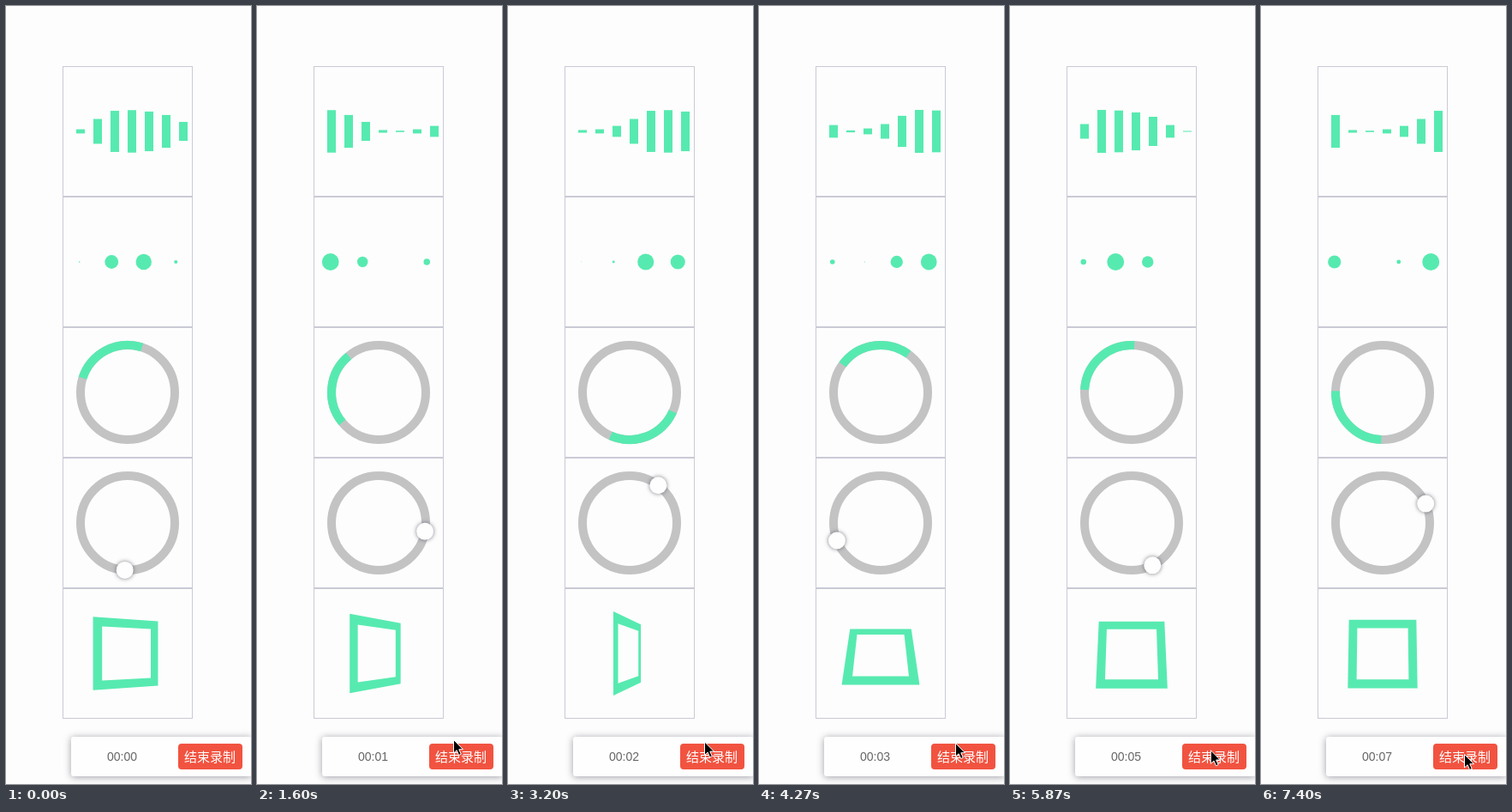
Recreate the animation shown at these times as an HTML page. Size 286 px wide and 906 px high, loop 7470 ms.

```html
<!DOCTYPE html>
<html lang="zh">
<head>
<meta charset="utf-8">
<style>
  html, body { margin: 0; width: 100%; height: 100%; overflow: hidden; background: #fdfdfd; }
  svg { display: block; }
  .panel { fill: none; stroke: #cacad6; }
  .green { fill: #57eab0; }
  .ring { fill: none; stroke: #c3c3c4; stroke-width: 10; }
  .arc { fill: none; stroke: #57eab0; stroke-width: 10; }
  .ball { fill: #fefefe; filter: drop-shadow(0 0 2.5px rgba(70, 70, 85, .7)); }
  .bar { fill: #fefefe; filter: drop-shadow(0 1px 4px rgba(40, 40, 60, .45)); }
  .time { font: 14px "Liberation Sans", Arial, sans-serif; fill: #666; }
  .label { font: 15px "Noto Sans CJK SC", "Noto Sans CJK", sans-serif; fill: #fff; text-anchor: middle; }
</style>
</head>
<body>
<svg id="stage" width="286" height="906" viewBox="0 0 286 906"></svg>
<script>
const LOOP = 7470, FRAME = 1000 / 15;
const ORIGIN = 0.67;        // moment, in seconds, when all loaders are at their start
const CLOCK_OFFSET = 0.33;
const stage = document.getElementById('stage');

function add(tag, attrs, text) {
  const el = document.createElementNS('http://www.w3.org/2000/svg', tag);
  set(el, attrs);
  if (text) el.textContent = text;
  return stage.appendChild(el);
}

function set(el, attrs) {
  for (const name in attrs) el.setAttribute(name, attrs[name]);
}

function bezier(x1, y1, x2, y2) {
  const at = (a, b, s) => 3 * a * s * (1 - s) ** 2 + 3 * b * s * s * (1 - s) + s ** 3;
  return x => {
    let lo = 0, hi = 1;
    for (let i = 0; i < 24; i++) {
      const mid = (lo + hi) / 2;
      if (at(x1, x2, mid) < x) lo = mid; else hi = mid;
    }
    return at(y1, y2, lo);
  };
}

const ease = bezier(.25, .1, .25, 1);
const easeIn = bezier(.42, 0, 1, 1);
const phase = (t, period) => ((t / period) % 1 + 1) % 1;

// Shrinks from 1 to 0 and grows back, once per second
function pulse(t) {
  const p = phase(t, 1) * 2;
  return p < 1 ? 1 - ease(p) : ease(p - 1);
}

for (let i = 0; i < 5; i++) {
  add('rect', { class: 'panel', x: 66.5, y: 70.5 + 152 * i, width: 151, height: 151 });
}

const bars = [0, .2, .3, .4, .5, .6, .7].map((delay, i) =>
  ({ delay, el: add('rect', { class: 'green', x: 82 + 20 * i, width: 10 }) }));

const dots = [0, .25, .5, .75].map((delay, i) =>
  ({ delay, el: add('circle', { class: 'green', cx: 85.75 + 37.5 * i, cy: 298 }) }));

add('circle', { class: 'ring', cx: 142, cy: 450, r: 55 });
const corner = 55 * Math.SQRT1_2;
const arc = add('path', {
  class: 'arc',
  d: `M${142 - corner} ${450 - corner}A55 55 0 0 1 ${142 + corner} ${450 - corner}`
});

add('circle', { class: 'ring', cx: 142, cy: 602, r: 55 });
const ball = add('circle', { class: 'ball', cx: 142, cy: 547, r: 10 });

const plane = add('path', { class: 'green', 'fill-rule': 'evenodd' });

add('rect', { class: 'bar', x: 76, y: 851, width: 211, height: 46, rx: 3 });
const clock = add('text', { class: 'time', x: 118, y: 879 });
add('rect', { x: 201, y: 859, width: 75, height: 30, rx: 4, fill: '#f15340' });
add('text', { class: 'label', x: 238, y: 879.5 }, '结束录制');

const cursor = add('path', {
  d: 'M0 0V15.5L3.6 12.2L6.1 18L8.8 16.8L6.3 11.2H11Z',
  fill: '#000', stroke: '#fff', 'stroke-width': 1
});
const cursorPath = [
  [.7, 288, 700], [.93, 234.5, 728.5], [1.6, 229.5, 854.5],
  [4.27, 229.5, 858.5], [5.2, 231.5, 862.5], [6.6, 237.5, 871.5]
];

function cursorAt(t) {
  const next = cursorPath.findIndex(p => p[0] > t);
  if (next === 0) return [-50, -50];
  if (next < 0) return cursorPath[cursorPath.length - 1].slice(1);
  const a = cursorPath[next - 1], b = cursorPath[next];
  const k = (t - a[0]) / (b[0] - a[0]);
  return [a[1] + (b[1] - a[1]) * k, a[2] + (b[2] - a[2]) * k];
}

// Outline of a square turned about one axis, seen from a distance of 200
function turnedSquare(half, angle, aboutX) {
  const points = [[-1, -1], [1, -1], [1, 1], [-1, 1]].map(([sx, sy]) => {
    const x = sx * half, y = sy * half;
    const scale = 200 / (200 + (aboutX ? y : x) * Math.sin(angle));
    const px = aboutX ? x : x * Math.cos(angle);
    const py = aboutX ? y * Math.cos(angle) : y;
    return `${(142 + px * scale).toFixed(2)} ${(754 + py * scale).toFixed(2)}`;
  });
  return `M${points.join('L')}Z`;
}

function draw(t) {
  const local = t - ORIGIN;

  for (const { el, delay } of bars) {
    const height = 1 + 49 * pulse(local - delay);
    set(el, { y: 146 - height / 2, height });
  }
  for (const { el, delay } of dots) set(el, { r: 10 * pulse(local - delay) });

  const spin = phase(local, 2);
  set(arc, { transform: `rotate(${360 * ease(spin)} 142 450)` });
  const angle = 2 * Math.PI * easeIn(spin);
  set(ball, { cx: 142 + 55 * Math.sin(angle), cy: 602 - 55 * Math.cos(angle) });

  const flip = phase(local, 1.5) * 2;
  const turn = (flip % 1) * Math.PI;
  set(plane, { d: turnedSquare(40, turn, flip < 1) + turnedSquare(30, turn, flip < 1) });

  clock.textContent = '00:0' + Math.max(0, Math.floor(t - CLOCK_OFFSET));
  set(cursor, { transform: `translate(${cursorAt(t)})` });
}

const start = performance.now();
function tick() {
  const elapsed = (performance.now() - start) % LOOP;
  draw(Math.floor((elapsed + 4) / FRAME) * FRAME / 1000);
  requestAnimationFrame(tick);
}

tick();
</script>
</body>
</html>
```
